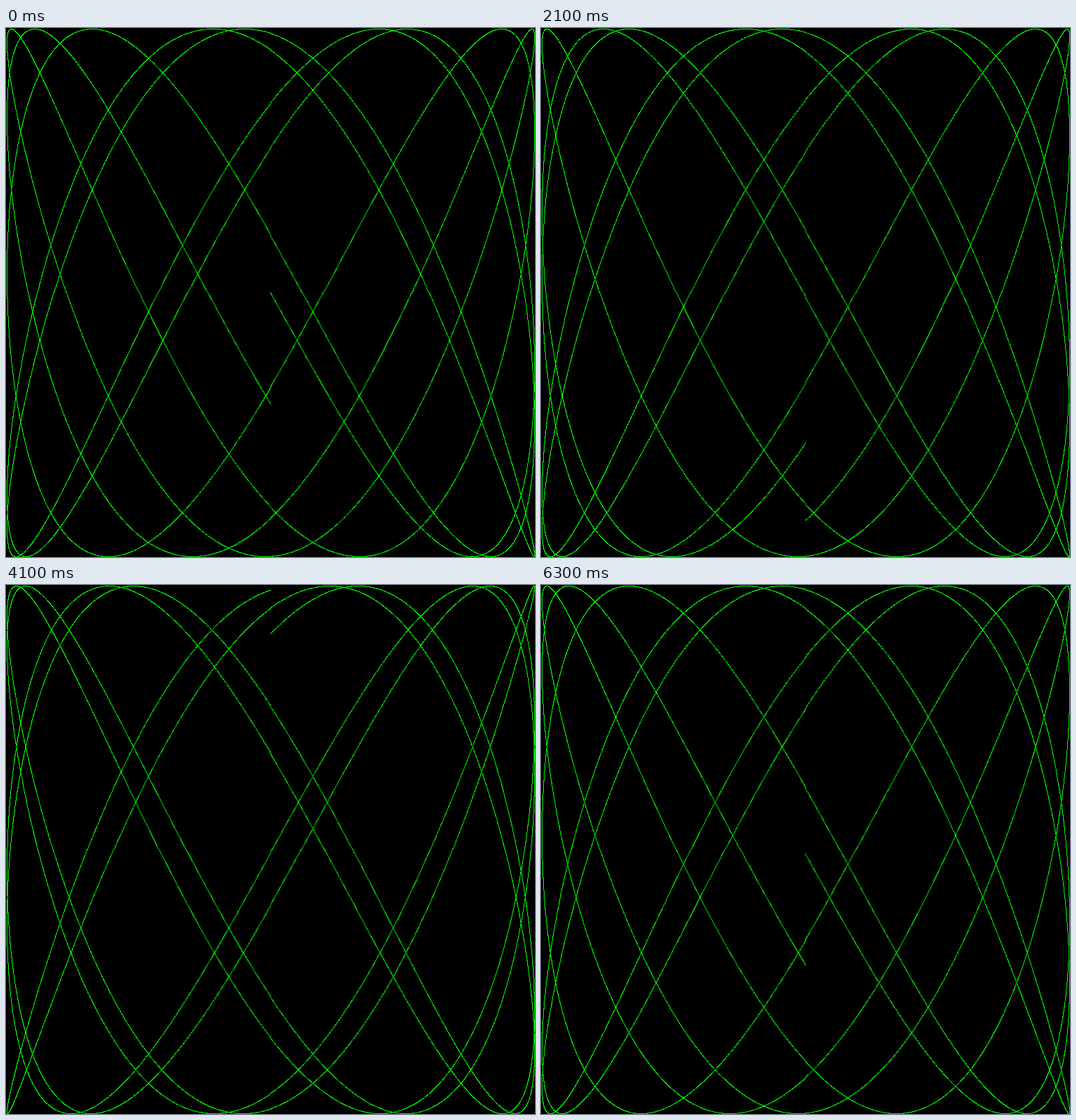
An HTML page with a canvas for the animation above (6400 ms loop, 748 px wide and 748 px high).

```html
<!DOCTYPE html>
<html lang="en">
<head>
<meta charset="utf-8">
<title>Lissajous</title>
<style>
  html, body { margin: 0; width: 100%; height: 100%; overflow: hidden; background: #000; }
  canvas { display: block; width: 748px; height: 748px; }
</style>
</head>
<body>
<canvas id="stage"></canvas>
<script>
// The plot is one pixel larger than the stage, so that it has a centre pixel; CSS scales it to fit.
const RADIUS = 374, SIZE = 2 * RADIUS + 1;
const CYCLES = 5, STEP = 0.001, FREQUENCY = 0.6046602879796196 * 3;
const POSES = 64, POSE_MS = 100, PHASE_STEP = 0.1;
const BLACK = 0xff000000, GREEN = 0xff00ff00;

const canvas = document.getElementById('stage');
canvas.width = canvas.height = SIZE;
const ctx = canvas.getContext('2d');
const image = ctx.createImageData(SIZE, SIZE);
const pixels = new Uint32Array(image.data.buffer);

// Rounds toward the centre for negative values, which leaves a small kink on the axes.
const toPixel = v => RADIUS + Math.trunc(v * RADIUS + 0.5);

function draw(phase) {
  pixels.fill(BLACK);
  for (let t = 0; t < CYCLES * 2 * Math.PI; t += STEP) {
    const x = toPixel(Math.sin(t));
    const y = toPixel(Math.sin(t * FREQUENCY + phase));
    pixels[y * SIZE + x] = GREEN;
  }
  ctx.putImageData(image, 0, 0);
}

let shown = -1;
function tick() {
  const pose = Math.floor(performance.now() / POSE_MS) % POSES;
  if (pose !== shown) draw(pose * PHASE_STEP);
  shown = pose;
  requestAnimationFrame(tick);
}
tick();
</script>
</body>
</html>
```
